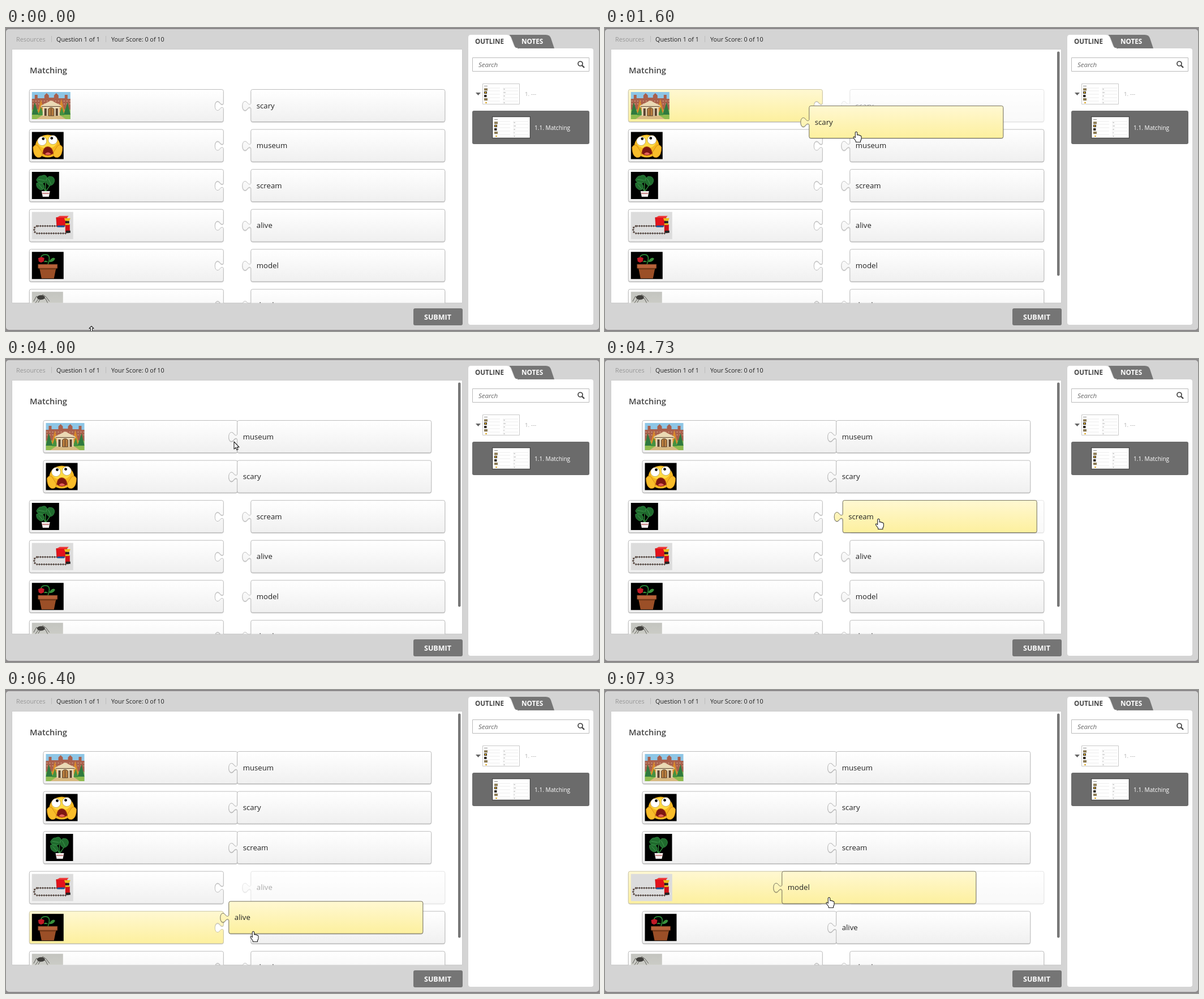
Animation of 1048x535 px, one loop 8000 ms. Source, as an HTML page:

```html
<!DOCTYPE html>
<html lang="en">
<head>
<meta charset="utf-8">
<title>Matching</title>
<style>
  html, body { margin: 0; width: 100%; height: 100%; overflow: hidden; background: #d4d4d4; }
  svg { display: block; width: 1048px; height: 535px; }
  text { font-family: "Open Sans", "Noto Sans", sans-serif; font-size: 13.2px; fill: #222; }
  .bar text { font-size: 10.8px; }
  .bold { font-weight: 700; }
  .piece > path { fill: url(#plain); stroke: #bdbdbd; filter: drop-shadow(0 1px .6px rgba(0, 0, 0, .2)); }
  .piece.lit > path { fill: url(#yellow); stroke: #cbc5a4; }
  .piece.held > path { fill: url(#yellow); stroke: #77745f; }
  .cursor { stroke: #222; stroke-width: 1.1; stroke-linejoin: round; fill: #fff; }
</style>
</head>
<body>
<svg viewBox="0 0 1048 535">
  <defs>
    <linearGradient id="plain" x2="0" y2="1"><stop stop-color="#fff"/><stop offset="1" stop-color="#f0f0f0"/></linearGradient>
    <linearGradient id="yellow" x2="0" y2="1"><stop stop-color="#fff8d2"/><stop offset="1" stop-color="#fdf09e"/></linearGradient>
    <linearGradient id="photo" x2="0" y2="1"><stop stop-color="#c3c4bf"/><stop offset="1" stop-color="#d6d6d0"/></linearGradient>
    <clipPath id="page"><rect x="11" y="38" width="795" height="447.5"/></clipPath>

    <g id="museum">
      <path fill="#8ec6e6" d="M0 0H68V48H0Z"/>
      <path fill="#a9604c" d="M0 12H5V5H10V11H22V6L26 2 30 6V10H39V6L43 2 47 6V11H58V5H63V12H68V32H0Z"/>
      <path stroke="#e3c4a4" stroke-dasharray="2 3" d="M1 16H68M1 21H68"/>
      <path fill="#8fba4e" d="M0 31H68V48H0Z"/>
      <path fill="#d8b982" d="M20 40H48L60 48H8Z"/>
      <path fill="#d98a2b" d="M10 36 16 13 22 36ZM46 36 52 12 58 36Z"/>
      <path fill="#2f7a3f" d="M0 40 5 18 12 40ZM56 40 63 18 68 40Z"/>
      <path fill="#46913f" d="M11 41 16 26 21 41ZM48 41 53 26 57 41Z"/>
      <path fill="#ead9b4" d="M16 24 34 15 52 24V27H49V42H19V27H16Z"/>
      <path fill="#5c4432" d="M22 42V29H26V42ZM42 42V29H46V42ZM17 25H51V26H17Z"/>
      <path fill="#b47a3c" stroke="#5c4432" d="M29 42V30Q34 25 39 30V42ZM34 29V42"/>
    </g>
    <g id="shock">
      <path d="M0 0H56V48H0Z"/>
      <ellipse cx="28" cy="25" rx="22" ry="20" fill="#f7b820"/>
      <ellipse cx="27" cy="18" rx="17" ry="11" fill="#ffda45"/>
      <path fill="#f9bd2a" stroke="#c27a10" stroke-width=".7" d="M2 27Q6 20 11 25L18 36Q20 46 10 45 2 42 2 27ZM54 27Q50 20 45 25L38 36Q36 46 46 45 54 42 54 27Z"/>
      <g fill="#fff" stroke="#9b7d35" stroke-width=".6"><circle cx="18" cy="16" r="8"/><circle cx="37" cy="14" r="8"/></g>
      <circle cx="20" cy="12" r="2.4"/><circle cx="35" cy="11" r="2.4"/>
      <path fill="#7c1712" stroke="#b9540c" d="M19 38Q20 26 28 26 36 26 38 38 28 45 19 38Z"/>
      <path fill="#e5605a" d="M23 39Q28 33 34 39 28 42 23 39Z"/>
    </g>
    <g id="plant">
      <path d="M0 0H48V48H0Z"/>
      <path stroke="#2d8b3a" stroke-width="1.5" fill="none" d="M24 35 18 20M24 35V18M24 35 33 22"/>
      <path fill="#1f6b2d" stroke="#379349" stroke-width=".7" d="M17 7Q25 3 27 11 25 18 20 20 10 21 8 14 12 6 17 7ZM30 8Q40 7 40 16 38 25 30 24 24 20 25 13ZM8 20Q18 16 22 25 22 32 16 32 7 29 8 20Z"/>
      <path stroke="#49a058" stroke-width=".8" d="M11 13 23 15M29 12 34 22M12 22 19 30"/>
      <path fill="#f4eeee" d="M17 34H32L30 44H19Z"/><path fill="#c98686" d="M18 37H31L30 39H19Z"/>
    </g>
    <g id="train">
      <path fill="#dcdcdc" d="M0 0H73V48H0Z"/>
      <rect x="4" y="25" width="61" height="13" rx="6" fill="none" stroke="#57392c" stroke-width="3.4" stroke-dasharray="1.6 2.6"/>
      <rect x="4" y="25" width="61" height="13" rx="6" fill="none" stroke="#4a4a4a"/>
      <path fill="#e3121b" stroke="#a00" stroke-width=".6" d="M43 10 62 8V23L44 25Z"/>
      <path fill="#ef3a38" d="M44 10 49 7H65L62 10Z"/>
      <path fill="#d01018" d="M59 22H67V36H59Z"/>
      <path fill="#e9bf1d" d="M57 11H68L66 16H59ZM59 20H66V23H59Z"/>
      <path fill="#18539c" d="M45 24H57V27H45Z"/>
      <path fill="#222" d="M59 16H66V20H59ZM60 33H68V37H60Z"/>
    </g>
    <g id="flower">
      <path d="M0 0H56V48H0Z"/>
      <path fill="none" stroke="#2b8a36" stroke-width="1.7" d="M28 23Q35 5 24 5 17 5 16 10"/>
      <path fill="#39913c" d="M31 16Q37 8 41 12 39 18 31 18ZM29 18Q23 13 21 18Z"/>
      <path fill="#c31926" d="M11 11 17 9 22 11 21 17 16 19 12 17Z"/>
      <path fill="#9b4f27" d="M13 27H43L39 47H17Z"/>
      <path fill="#b7623a" stroke="#71391d" stroke-width=".7" d="M11 22H45V29H11Z"/>
      <path fill="#713817" d="M13 29H43V31H14Z"/>
    </g>
    <g id="spider">
      <path fill="url(#photo)" d="M0 0H55V48H0Z"/>
      <path fill="none" stroke="#5e5d58" d="M3 17 8 8 14 12 19 5 25 9 31 17M6 20 12 12M11 19 16 11 24 12 28 20"/>
      <ellipse cx="16" cy="10" rx="7" ry="4" fill="#403f3c"/>
    </g>
    <g id="thumb">
      <path fill="#fff" stroke="#c9c9c9" d="M.5.5H65.5V36.5H.5Z"/>
      <path stroke="#888" d="M3 4.500H9"/>
      <path stroke="#ddd" stroke-width=".6" d="M3 8H31M3 13H31M3 19H31M3 25H31M3 31H31M36 8H63M36 13H63M36 19H63M36 25H63M36 31H63"/>
      <path stroke="#aaa" d="M37 10H40M37 16H41M37 22H40M37 28H39M37 34H40"/>
      <path stroke="#8a7a55" stroke-width="4" d="M3 10.500H9M3 28H9"/>
      <path stroke="#302a22" stroke-width="4" d="M3 16H8M3 22H7.500"/>
      <path stroke="#d9a930" stroke-width="2" d="M4 16H7M5 34H8"/>
    </g>
  </defs>

  <path fill="#8b888a" d="M0 0H1048V535H0Z"/>
  <rect y="2" width="1048" height="531" rx="5" fill="#d4d4d4"/>
  <g class="bar">
    <text x="18" y="23.500" style="fill:#979797">Resources</text>
    <text x="89" y="23.500">Question 1 of 1</text>
    <text x="186" y="23.500">Your Score: 0 of 10</text>
    <path stroke="#bcbcbc" d="M80.500 14V25M176.500 14V25"/>
  </g>
  <path fill="#fff" stroke="#cacaca" d="M10.500 37.500H806.500V485.500H10.500Z"/>
  <rect x="720" y="495" width="87" height="30" rx="3" fill="#757575"/>
  <text class="bold" x="739" y="514.500" style="font-size:12.5px;fill:#fff">SUBMIT</text>

  <rect x="817" y="36" width="221" height="488" rx="4" fill="#fff"/>
  <path fill="#757575" d="M890 36V12H954Q961 12 963 18L969 36Z"/>
  <path fill="#fff" stroke="#d4d4d4" d="M816.500 36.500V17Q816.500 11.500 822 11.500H884Q891 11.500 893 18L898 31Q900 36.500 906 36.500Z"/>
  <path fill="#fff" d="M817 35H904V41H817Z"/>
  <text class="bold" x="829" y="28" style="font-size:11.6px;fill:#444">OUTLINE</text>
  <text class="bold" x="911" y="28" style="font-size:11.7px;fill:#fff">NOTES</text>
  <path fill="#fff" stroke="#bbb" d="M824.500 52.500H1030.500V76.500H824.500Z"/>
  <text x="835" y="69" style="font-size:11.5px;font-style:italic;fill:#666">Search</text>
  <g fill="none" stroke="#444" stroke-width="1.7"><circle cx="1015" cy="63" r="4"/><path stroke-width="2.4" d="M1018 66 1022 70"/></g>
  <path fill="#666" d="M830 114H839L834.500 119Z"/>
  <use href="#thumb" x="842" y="98"/>
  <text x="917" y="120" style="font-size:9.8px;fill:#aaa">1. ---</text>
  <rect x="824" y="146" width="207" height="59" rx="3" fill="#6b6b6b"/>
  <path fill="#444" d="M859 156H927V195H859Z"/>
  <use href="#thumb" x="860" y="157"/>
  <text x="934" y="179.500" style="font-size:10.1px;fill:#fff">1.1. Matching</text>

  <g clip-path="url(#page)">
    <text x="42" y="80" style="font-size:14.7px;font-weight:600;fill:#444">Matching</text>
    <g id="pieces"></g>
  </g>
  <rect id="scroll" x="799" y="41.500" width="4.500" height="396" rx="2" fill="#777"/>
  <path id="resize" class="cursor" d="M151 526.500 155 530.500H152.500V536H149.500V530.500H147Z"/>
  <path id="arrow" class="cursor" d="M0 0V13L3 10.300 5 14.700 7 13.800 5.200 9.600H9Z"/>
  <path id="hand" class="cursor" d="M-1.700 1.500Q0-1 1.700 1.500V6Q4 5 5 6.500 7 6 7.500 7.500 9 7.200 9 9V12.500Q9 14.500 7.500 16V18.500H-.7V16.500L-4.500 11.500Q-5.500 9.500-4.300 9-3 8.800-1.700 10.700Z"/>
</svg>
<script>
const LOOP = 8000, W = 343, H = 57;
const LEFT = 41.3, RIGHT = 432.8, JOIN_LEFT = 66, JOIN_RIGHT = 408.7;
const pictures = ["museum", "shock", "plant", "train", "flower", "spider"];
const words = ["scary", "museum", "scream", "alive", "model", "dead"];
const rowY = row => 108.5 + 70.55 * row;
const $ = id => document.getElementById(id);

// Cursor path: time, x, y of the hot spot
const path = [
  [470, 190, 493], [800, 310, 365], [1130, 478, 190], [1270, 516, 154], [1600, 444, 183],
  [1870, 437, 222], [2200, 437, 222], [2670, 500, 207], [3000, 491, 146], [3670, 403, 146],
  [4200, 403, 146], [4470, 496, 282], [4670, 496, 282], [5070, 412, 282], [5470, 412, 282],
  [6070, 476, 373], [6130, 476, 373], [6270, 466, 382], [6400, 437, 426], [6730, 414, 440],
  [6870, 414, 440], [7130, 482, 425], [7400, 516, 366], [7600, 516, 366], [7930, 396, 366]
];
const drags = [
  { word: 0, grab: 1270, drop: 2200, row: 1 },
  { word: 1, grab: 3000, drop: 4000, row: 0 },
  { word: 2, grab: 4670, drop: 5470, row: 2 },
  { word: 3, grab: 6130, drop: 6870, row: 4 },
  { word: 4, grab: 7600, drop: LOOP, row: 3 }
];

function cursorAt(time) {
  const next = path.findIndex(key => key[0] > time);
  if (next < 0) return path[path.length - 1].slice(1);
  if (next === 0) return path[0].slice(1);
  const a = path[next - 1], b = path[next], u = (time - a[0]) / (b[0] - a[0]);
  return [a[1] + (b[1] - a[1]) * u, a[2] + (b[2] - a[2]) * u];
}

// The knob is drawn downwards along the edge at x
const knob = x => `V24C${x} 27 ${x - 4} 27 ${x - 6} 24C${x - 9} 19 ${x - 15} 20 ${x - 15} 29` +
  `S${x - 9} 39 ${x - 6} 34C${x - 4} 31 ${x} 31 ${x} 34`;
const leftShape = `M3 0H340Q343 0 343 3${knob(W)}V54Q343 57 340 57H3Q0 57 0 54V3Q0 0 3 0Z`;
const rightShape = `M340 0H3Q0 0 0 3${knob(0)}V54Q0 57 3 57H340Q343 57 343 54V3Q343 0 340 0Z`;

function addPiece(shape, content) {
  const g = document.createElementNS("http://www.w3.org/2000/svg", "g");
  g.innerHTML = `<path d="${shape}"/>${content}`;
  $("pieces").append(g);
  return g;
}
const wordContent = word => `<text x="10" y="33">${word}</text>`;
const lefts = pictures.map(name => addPiece(leftShape, `<use href="#${name}" x="4.500" y="4.500"/>`));
const rights = words.map(word => addPiece(rightShape, wordContent(word)));
const held = addPiece(rightShape, wordContent(""));

function place(piece, x, y, state = "", opacity = 1) {
  piece.setAttribute("transform", `translate(${x} ${y})`);
  piece.setAttribute("class", "piece " + state);
  piece.setAttribute("opacity", opacity);
}
const show = (element, visible) => element.setAttribute("visibility", visible ? "visible" : "hidden");

function render(time) {
  const rows = words.map((_, i) => i), joined = new Set();
  for (const { word, drop, row } of drags) {
    if (time < drop) continue;
    rows[rows.indexOf(row)] = rows[word];
    rows[word] = row;
    joined.add(row);
  }

  const [cx, cy] = cursorAt(time);
  const active = time >= 470;
  const drag = drags.find(d => time > d.grab && time < d.drop);
  const over = (x, y) => active && !drag && cx >= x && cx <= x + W && cy >= y && cy <= y + H && cy < 485;
  let pointing = !!drag, target = -1;

  show(held, drag);
  if (drag) {
    const [gx, gy] = cursorAt(drag.grab);
    const x = RIGHT + cx - gx, y = rowY(rows[drag.word]) + cy - gy;
    if (x - 15 < LEFT + W) target = Math.floor((y + H / 2 - 101.5) / 70.55);
    held.querySelector("text").textContent = words[drag.word];
    place(held, x, y, "held");
  }
  lefts.forEach((piece, row) => {
    const fixed = joined.has(row), y = rowY(row);
    const hover = !fixed && over(LEFT, y);
    pointing ||= hover;
    place(piece, fixed ? JOIN_LEFT : LEFT, y, hover || target === row ? "lit" : "");
  });
  rights.forEach((piece, word) => {
    const x = joined.has(rows[word]) ? JOIN_RIGHT : RIGHT, y = rowY(rows[word]);
    const hover = over(x, y);
    pointing ||= hover;
    place(piece, x, y, hover ? "lit" : "", drag && drag.word === word ? 0.38 : 1);
  });

  show($("scroll"), time >= 530);
  show($("resize"), time < 70);
  show($("arrow"), active && !pointing);
  show($("hand"), active && pointing);
  for (const id of ["arrow", "hand"]) $(id).setAttribute("transform", `translate(${cx} ${cy})`);
}

function tick() {
  const step = Math.floor((performance.now() % LOOP + 4) * 0.015);
  render(Math.min(10 * Math.round(step * 20 / 3), LOOP - 1));
  requestAnimationFrame(tick);
}
tick();
</script>
</body>
</html>
```
